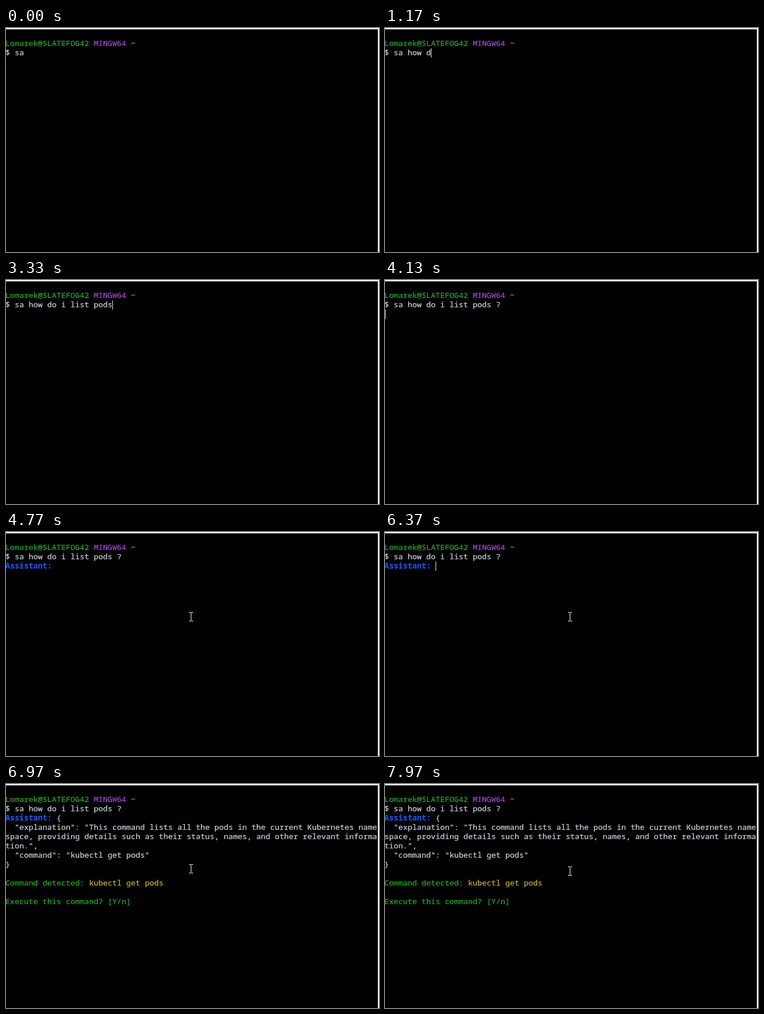
Animation, 642 px wide and 386 px high, one loop 8000 ms. Source, as an HTML page:

```html
<!DOCTYPE html>
<html lang="en">
<head>
<meta charset="utf-8">
<title>Terminal assistant</title>
<style>
html, body { margin: 0; width: 100%; height: 100%; overflow: hidden; background: #000; }
#stage { position: relative; width: 642px; height: 386px; overflow: hidden; background: #000; }
#stage > * { position: absolute; }
.top { left: 0; top: 0; width: 642px; height: 2px; background: #f0f0fa; border-bottom: 1px solid #484850; }
.right { left: 640px; top: 0; width: 2px; height: 386px; background: #f0f0f6; }
pre {
  left: -1px; top: 18px; margin: 0; color: #d0d6e2;
  font: 13.3333px/16px "Noto Sans Mono", "DejaVu Sans Mono", monospace;
  font-variant-ligatures: none;
  -webkit-text-stroke: 0.2px currentColor;
}
.green { color: #22b022; }
.purple { color: #a945e4; }
.yellow { color: #c6b428; }
.blue { color: #1c58f6; font-weight: bold; -webkit-text-stroke: 0; }
#caret { width: 1px; height: 16px; background: #e4e4e4; }
#mouse { left: 315px; top: 138px; }
</style>
</head>
<body>
<div id="stage">
  <pre><span class="green">Lomarek@SLATEFOG42</span> <span class="purple">MINGW64</span> <span class="yellow">~</span>
$ <span id="typed">sa</span>
<span id="label" class="blue">Assistant:</span> <span id="reply"></span><span id="prompt" class="green">

Command detected: <span class="yellow">kubectl get pods</span>

Execute this command? [Y/n]</span></pre>
  <div id="caret"></div>
  <svg id="mouse" width="7" height="16" shape-rendering="crispEdges" fill="#fff">
    <path d="M0 0h3v1h1v-1h3v1h-3v14h3v1h-3v-1h-1v1h-3v-1h3v-14h-3z"/>
  </svg>
  <div class="top"></div>
  <div class="right"></div>
</div>
<script>
const LOOP = 8000;
const ENTER = 3960, LABEL = 4500, POINTER = 4520, REPLY = 6400, PROMPT = 6790;
const BLINK = 600, BLINK_START = 4270;
const STEP = 1000 / 30, TOKEN_MS = 6;

const command = 'sa how do i list pods ?';
// Bursts of keystrokes: first key time, gap between keys, number of keys
const bursts = [[260, 130, 4], [900, 150, 3], [1400, 130, 2], [1700, 110, 5], [2500, 160, 5], [3480, 150, 2]];
const keys = bursts.flatMap(([start, gap, n]) => Array.from({ length: n }, (_, i) => start + i * gap));

const tokens = `{
  "explanation": "This command lists all the pods in the current Kubernetes name
space, providing details such as their status, names, and other relevant informa
tion.",
  "command": "kubectl get pods"
}`.match(/ ?\w+|\W+?(?= ?\w|$)/g);

const $ = id => document.getElementById(id);
const [typed, label, reply, prompt, caret, mouse] =
  ['typed', 'label', 'reply', 'prompt', 'caret', 'mouse'].map($);
const show = (el, on) => { el.style.visibility = on ? 'visible' : 'hidden'; };

function caretOn(t) {
  if (t < keys[0] || t >= REPLY) return false;
  if (t < LABEL) return true;
  return Math.floor((t - BLINK_START) / BLINK) % 2 === 1;
}

function draw(t) {
  const length = 2 + keys.filter(k => k <= t).length;
  typed.textContent = command.slice(0, length);

  const elapsed = Math.floor(Math.max(0, t - REPLY) / STEP + 1) * STEP;
  const count = t < REPLY ? 0 : Math.floor(elapsed / TOKEN_MS);
  reply.textContent = tokens.slice(0, count).join('');

  show(label, t >= LABEL);
  show(prompt, t >= PROMPT);

  const row = t < ENTER ? 1 : 2;
  const column = t < ENTER ? length + 2 : t < LABEL ? 0 : 11;
  caret.style.left = Math.max(0, column * 8 - 1) + 'px';
  caret.style.top = 19 + row * 16 + 'px';
  show(caret, caretOn(t));

  const drop = Math.min(1, Math.max(0, (t - 7700) / 200));
  mouse.style.transform = `translateY(${Math.round(drop * 4)}px)`;
  show(mouse, t >= POINTER);
}

const origin = performance.now();
function frame() {
  draw((performance.now() - origin) % LOOP);
  requestAnimationFrame(frame);
}
draw(0);
requestAnimationFrame(frame);
</script>
</body>
</html>
```
